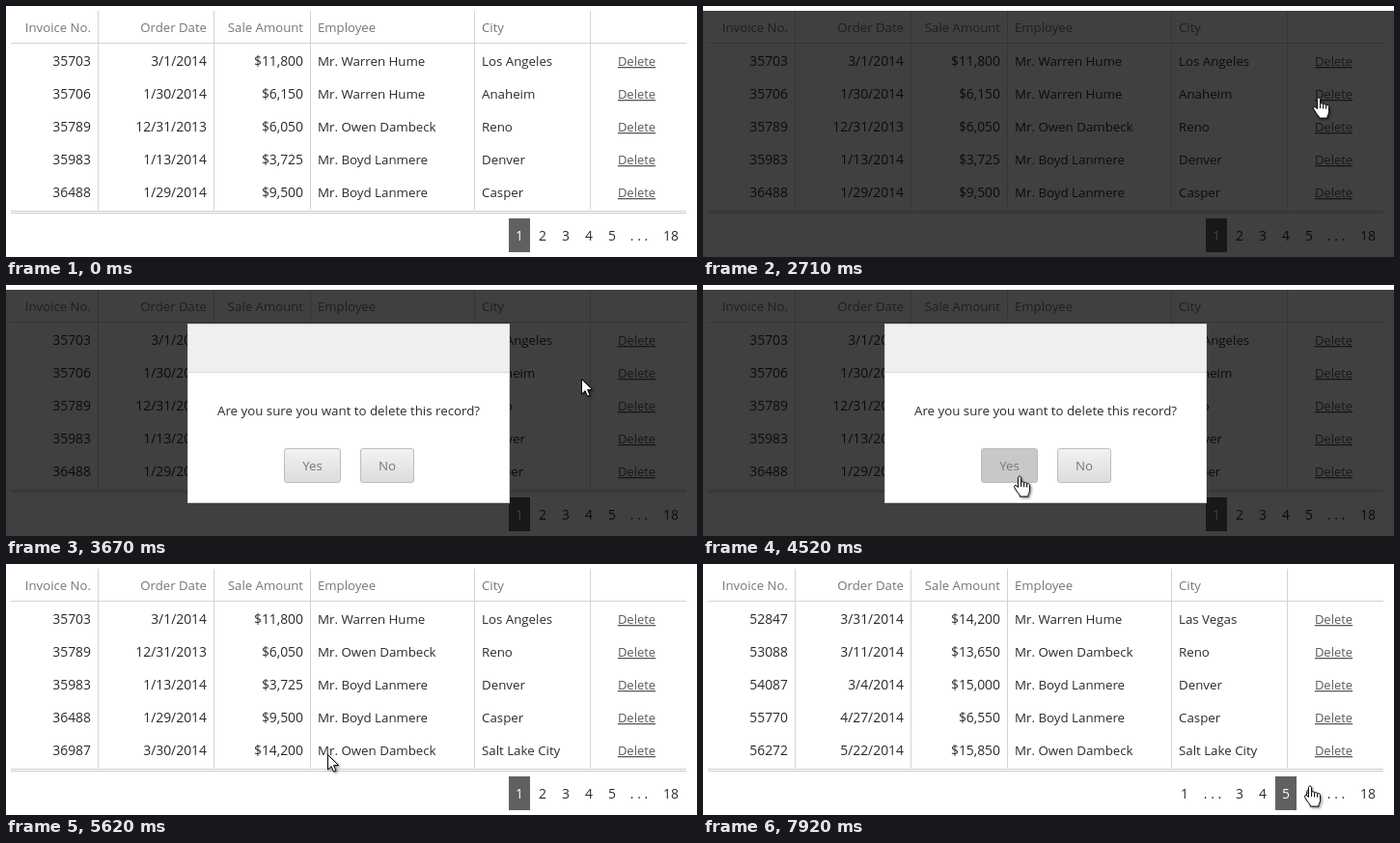
These frames come from a looping animation (716 by 260 pixels, 8000 ms). An HTML page:

```html
<!DOCTYPE html>
<html lang="en">
<head>
<meta charset="utf-8">
<title>Invoice grid</title>
<style>
html, body { margin: 0; width: 100%; height: 100%; overflow: hidden; background: #fff; }
svg { display: block; width: 716px; height: 260px; font: 13.3px "Open Sans", "Noto Sans", sans-serif; fill: #2b2b2b; cursor: default; }
.num { font-size: 13.9px; }
.head { font-size: 13.2px; fill: #767676; }
.link { font-size: 13px; fill: #5a5a5a; text-decoration: underline; }
.end { text-anchor: end; }
.mid { text-anchor: middle; }
.btn { stroke: #bdbdbd; }
.btnText { fill: #777; text-anchor: middle; }
</style>
</head>
<body>
<svg viewBox="0 0 716 260" xmlns="http://www.w3.org/2000/svg">
  <defs>
    <linearGradient id="face" x2="0" y2="1"><stop stop-color="#f2f2f2"/><stop offset="1" stop-color="#dcdcdc"/></linearGradient>
    <linearGradient id="hover" x2="0" y2="1"><stop stop-color="#e6e6e6"/><stop offset="1" stop-color="#cfcfcf"/></linearGradient>
    <filter id="panelShadow" x="-10%" y="-20%" width="120%" height="150%"><feDropShadow dx="0" dy="2" stdDeviation="4" flood-opacity=".35"/></filter>
    <filter id="cursorShadow" x="-30%" y="-20%" width="180%" height="160%"><feDropShadow dx="1.5" dy="1.5" stdDeviation="1" flood-opacity=".4"/></filter>
  </defs>
  <rect width="716" height="260" fill="#fff"/>
  <path id="lines" fill="none" stroke="#d3d3d3"/>
  <path d="M5 212.5H705M5 214.5H705" stroke="#cdcdcd"/>
  <g id="header"></g>
  <g id="rows"></g>
  <g id="pager"></g>
  <rect id="shade" y="5" width="716" height="255" fill="#000" opacity=".75"/>
  <g id="dialog">
    <rect x="188.5" y="40.5" width="333" height="185" fill="#fff" stroke="#d6d6d6"/>
    <rect x="189" y="41" width="332" height="49" fill="#efefef"/>
    <path d="M189 90.5H521" stroke="#d9d9d9"/>
    <text class="mid" x="355" y="135">Are you sure you want to delete this record?</text>
    <rect id="yes" class="btn" x="288.5" y="169.5" width="58" height="35" rx="2.5"/>
    <text class="btnText" x="317.5" y="192">Yes</text>
    <rect class="btn" x="367.5" y="169.5" width="55" height="35" rx="2.5" fill="url(#face)"/>
    <text class="btnText" x="395" y="192">No</text>
  </g>
  <g id="loader">
    <rect x="255.5" y="91.5" width="199" height="69" fill="#fff" stroke="#d0d0d0" filter="url(#panelShadow)"/>
    <g id="spinner" transform="translate(356 118)"></g>
    <text class="mid" x="355" y="153" font-size="13">Loading...</text>
  </g>
  <g id="cursor" filter="url(#cursorShadow)" fill="#fff" stroke="#000" stroke-linejoin="round">
    <path id="arrow" d="M.5 .5V16L4.1 12.6 6.5 18.2 9 17.1 6.6 11.6H11.6Z"/>
    <path id="hand" transform="translate(1 .6)" d="M-1.6 2C-1.6 0 1.6 0 1.6 2V7C2.2 5.7 4.6 5.9 4.6 7.6 5.4 6.5 7.6 6.9 7.6 8.6 8.5 7.6 10.6 8.1 10.6 9.9V15C10.6 17.4 9 18.4 9 20V21.5H.2V20C-2 17.2-4.8 13.6-5.4 11.6-5.9 9.7-4.1 9.3-3 10.5L-1.6 12ZM1.6 7V11.5M4.6 7.6V11.8M7.6 8.6V12"/>
  </g>
</svg>
<script>
const LOOP = 8000;
const $ = id => document.getElementById(id);
const text = (x, y, cls, s) => `<text x="${x}" y="${y}" class="${cls}">${s}</text>`;
const show = (id, on) => $(id).setAttribute("display", on ? "inline" : "none");

const [ann, ben, cal] = ["Mr. Warren Hume", "Mr. Owen Dambeck", "Mr. Boyd Lanmere"];
const firstPage = [
  ["35703", "3/1/2014", "$11,800", ann, "Los Angeles"],
  ["35706", "1/30/2014", "$6,150", ann, "Anaheim"],
  ["35789", "12/31/2013", "$6,050", ben, "Reno"],
  ["35983", "1/13/2014", "$3,725", cal, "Denver"],
  ["36488", "1/29/2014", "$9,500", cal, "Casper"],
  ["36987", "3/30/2014", "$14,200", ben, "Salt Lake City"]
];
const pages = {
  initial: firstPage.slice(0, 5),
  deleted: firstPage.filter((_, i) => i !== 1),
  fifth: [
    ["52847", "3/31/2014", "$14,200", ann, "Las Vegas"],
    ["53088", "3/11/2014", "$13,650", ben, "Reno"],
    ["54087", "3/4/2014", "$15,000", cal, "Denver"],
    ["55770", "4/27/2014", "$6,550", cal, "Casper"],
    ["56272", "5/22/2014", "$15,850", ben, "Salt Lake City"]
  ]
};
const columns = [88, 208, 308, 323, 493];
const cells = (values, y, cls) => values.map((v, i) =>
  text(columns[i], y, (i < 3 ? "end " : "") + (cls || (i < 3 ? "num" : "")), v)).join("");

$("lines").setAttribute("d", "M5 38.5H705" + [95, 215, 315, 485, 605].map(x => `M${x}.5 5V211`).join(""));
$("header").innerHTML = cells(["Invoice No.", "Order Date", "Sale Amount", "Employee", "City"], 27, "head");
$("spinner").innerHTML = Array.from({ length: 8 }, (_, i) =>
  `<rect x="-2" y="-14" width="4" height="8" transform="rotate(${i * 45})"/>`).join("");

let shownRows, shownPager;
function setRows(key) {
  if (key === shownRows) return;
  shownRows = key;
  $("rows").innerHTML = pages[key].map((row, i) => {
    const y = 62 + 34 * i;
    return cells(row, y) + text(653.5, y, "mid link", "Delete");
  }).join("");
}

function setPager(current) {
  if (current === shownPager) return;
  shownPager = current;
  const gap = ". . .";
  const items = current === 1
    ? [[1, 532], [2, 556], [3, 580], [4, 604], [5, 628], [gap, 656], [18, 689]]
    : [[1, 499], [gap, 528], [3, 556], [4, 580], [5, 604], [6, 628], [gap, 656], [18, 689]];
  $("pager").innerHTML = items.map(([label, x]) => label === current
    ? `<rect x="${x - 11}" y="220" width="22" height="35" fill="#606060"/><g fill="#fff">${text(x, 243, "mid num", label)}</g>`
    : text(x, 243, "mid num", label)).join("");
}

const clamp = v => Math.min(1, Math.max(0, v));
const span = (t, from, to) => clamp((t - from) / (to - from));
const smooth = p => p * p * (3 - 2 * p);
const mix = (a, b, p) => a + (b - a) * p;

// The CSS "ease" curve, solved by bisection.
function ease(x) {
  const curve = (s, a, b) => 3 * (1 - s) ** 2 * s * a + 3 * (1 - s) * s * s * b + s ** 3;
  let lo = 0, hi = 1;
  for (let i = 0; i < 20; i++) {
    const s = (lo + hi) / 2;
    if (curve(s, .25, .25) < x) lo = s; else hi = s;
  }
  return curve(lo, .1, 1);
}

function cursorAt(t) {
  if (t < 3490) {
    const p = 1 - (1 - span(t, 1260, 1780)) ** 2;
    return [mix(714, 637, p), mix(186, 94, p)];
  }
  if (t < 5460) {
    const p = smooth(span(t, 3490, 4120) ** 1.18);
    return [mix(637, 327, p), mix(95, 197, p * p)];
  }
  if (t < 5780) return [t < 5620 ? 330 : 333, 197];
  if (t < 7720) {
    const p = smooth(span(t, 5780, 6470) ** .85);
    return [mix(333, 631, p), 197 - 20 * p * (1 - p) + 39 * p * p];
  }
  const p = span(t, 7640, 7920);
  return [mix(631, 628, p), mix(236, 229, p)];
}

const overYes = (x, y) => x > 288 && x < 347 && y > 169 && y < 205;
function isHand(t, x, y) {
  if (t < 3490) return x > 633 && x < 674 && Math.abs((y - 57 + 340) % 34 - 4) < 9;
  if (t < 4670) return overYes(x, y);
  return t < 5070 || y > 220;
}

function drawDialog(t, x, y) {
  const open = t >= 2710 && t < 5070;
  show("dialog", open);
  show("shade", t >= 2710 && t < 4670);
  if (!open) return;
  const k = t < 4670 ? ease(span(t, 2710, 3110)) : 1 - ease(span(t, 4670, 5070));
  $("dialog").setAttribute("transform", `translate(355 133) scale(${k}) translate(-355 -133)`);
  $("dialog").setAttribute("opacity", k);
  const pressed = t >= 4520 && t < 4670;
  const hovered = t >= 3490 && t < 4670 && overYes(x, y);
  $("yes").setAttribute("fill", pressed ? "#c8c8c8" : hovered ? "url(#hover)" : "url(#face)");
}

function drawLoader(t) {
  const busy = (t >= 4670 && t < 5070) || (t >= 7000 && t < 7220);
  show("loader", busy);
  if (!busy) return;
  const lead = Math.floor((t - 4740) / 100) + 80;
  [...$("spinner").children].forEach((spoke, i) =>
    spoke.setAttribute("opacity", 1 - .11 * ((lead - i) % 8)));
}

function render(t) {
  setRows(t < 4740 ? "initial" : t < 7080 ? "deleted" : "fifth");
  setPager(t < 6670 ? 1 : 5);
  const [x, y] = cursorAt(t);
  drawDialog(t, x, y);
  drawLoader(t);
  show("cursor", t >= 1260);
  $("cursor").setAttribute("transform", `translate(${Math.round(x)} ${Math.round(y)})`);
  const hand = isHand(t, x, y);
  show("hand", hand);
  show("arrow", !hand);
}

const start = performance.now();
function frame() {
  render((performance.now() - start) % LOOP);
  requestAnimationFrame(frame);
}
frame();
</script>
</body>
</html>
```
